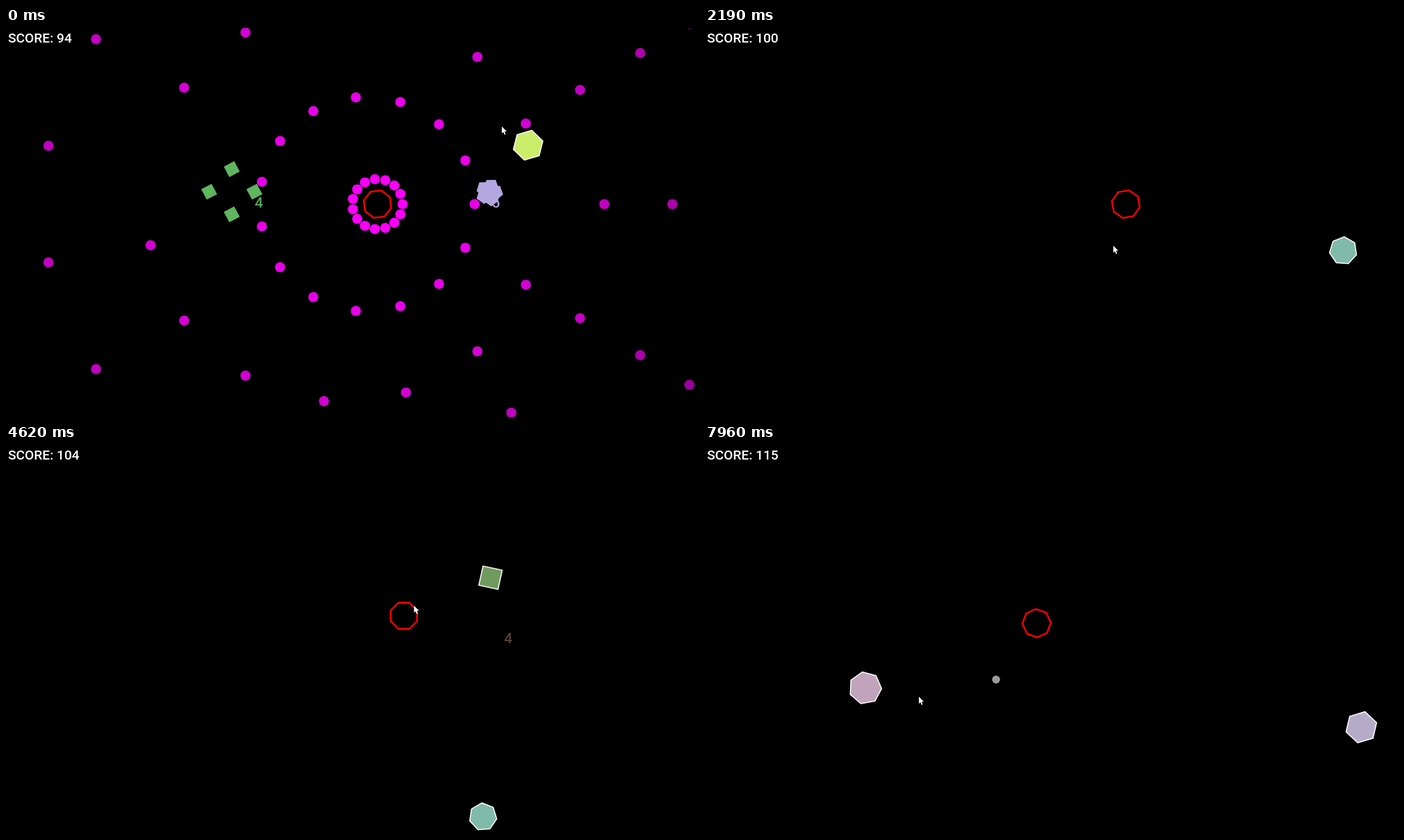
An HTML page with a canvas for the animation above (8000 ms loop, 998 by 561 pixels).

```html
<!DOCTYPE html>
<html lang="en">
<head>
<meta charset="utf-8">
<title>Polygon shooter</title>
<style>
  html, body { margin: 0; width: 100%; height: 100%; overflow: hidden; background: #000; }
  canvas { display: block; width: 998px; height: 561px; }
</style>
</head>
<body>
<canvas id="stage" width="998" height="561"></canvas>
<script>
const W = 998, H = 561, LOOP = 8000;
const SPIN = 0.06;            // degrees per ms
const SHARD_SPEED = 0.18, SHARD_LIFE = 500, LABEL_LIFE = 2000;
const SHOT_SPEED = 0.62, SHOT_LIFE = 420, RING_SPEED = 0.66;
const ctx = document.getElementById('stage').getContext('2d');
const rad = deg => deg * Math.PI / 180;

// Position at time `at`, drifting at (vx, vy) and bouncing off the walls.
const enemies = [
  { sides: 4, r: 20, color: '95,182,95', at: 0, x: 357, y: 239, vx: .177, vy: .016, born: -900, dies: -180 },
  { sides: 5, r: 19, color: '180,166,222', at: 0, x: 698.5, y: 239.5, vx: .053, vy: .05, born: -900, dies: -50 },
  { sides: 6, r: 22, color: '202,237,106', at: 0, x: 752, y: 169, vx: -.096, vy: .043, angle: 44, born: -900, dies: 140 },
  { sides: 7, r: 20, color: '128,186,170', at: 2190, x: 919, y: 321, vx: .144, vy: .0925, angle: 17, born: 1500, dies: 5970 },
  { sides: 4, r: 20, color: '180,131,95', at: 3770, x: 569, y: 232, vx: .173, vy: .04, angle: 30, born: 2260, dies: 3620 },
  { sides: 4, r: 20, color: '112,155,95', at: 5500, x: 558, y: 267, vx: -.159, vy: .086, angle: 20, born: 4150, dies: 5185 },
  { sides: 6, r: 23, color: '181,171,200', at: 6650, x: 761, y: 274, vx: .1405, vy: .1015, angle: 24.5, born: 5700, dies: 9000 },
  { sides: 7, r: 23.5, color: '193,163,187', at: 7960, x: 231, y: 350.5, vx: -.131, vy: -.111, angle: 2.5, born: 6700, dies: 9000 },
];

// Rings of 15 bullets: radius at time 0 (negative = not fired yet), centre x, bullets already spent.
const rings = [
  { r: 640, x: 399 }, { r: 535, x: 424 }, { r: 404, x: 457 },
  { r: 285, x: 487.7, spent: k => k === 0 || k === 8 },
  { r: 154.2, x: 520, spent: (k, t) => k === 14 && t > 140 },
  { r: 35.5, x: 535 }, { r: -119, x: 562 },
];

// Single shots: time fired, point aimed at, time of impact if any.
const shots = [
  [3480, 543, 226, 3620], [3718, 598, 231], [5080, 608, 240, 5185], [5424, 561, 261],
  [5720, 492, 413, 5970], [6460, 531, 333], [7805, 420, 337],
];

const playerPath = [[0, 535, 254], [16, 535, 254], [180, 562, 254], [920, 633, 254], [2190, 606, 254],
  [3770, 630, 236], [5500, 514, 257], [6650, 428, 257], [LOOP, 479, 257]];
const cursorPath = [[0, 714, 142], [920, 593, 295], [2190, 588, 314], [3770, 550, 219], [5150, 606, 238],
  [5500, 576, 269], [5930, 500, 400], [6650, 662, 334], [7960, 308, 363], [LOOP, 308, 363]];
const scores = [[0, 94], [140, 100], [3620, 104], [5185, 108], [5970, 115]];

function along(path, t, ease = u => u) {
  const i = Math.max(1, path.findIndex(p => p[0] > t));
  const [a, b] = [path[i - 1], path[i]];
  const u = ease((t - a[0]) / (b[0] - a[0]));
  return [a[1] + (b[1] - a[1]) * u, a[2] + (b[2] - a[2]) * u];
}
const smooth = u => u * u * (3 - 2 * u);

function bounce(v, low, high) {
  const span = high - low;
  const m = (((v - low) % (2 * span)) + 2 * span) % (2 * span);
  return low + (m > span ? 2 * span - m : m);
}

function enemyAt(e, t) {
  return [bounce(e.x + e.vx * (t - e.at), e.r, W - e.r),
          bounce(e.y + e.vy * (t - e.at), e.r, H - e.r)];
}

function polygon(x, y, r, sides, angle) {
  ctx.beginPath();
  for (let k = 0; k < sides; k++) {
    const a = rad(angle + 360 * k / sides);
    ctx.lineTo(x + r * Math.cos(a), y + r * Math.sin(a));
  }
  ctx.closePath();
}

function dot(x, y, r, color) {
  ctx.fillStyle = color;
  ctx.beginPath();
  ctx.arc(x, y, r, 0, 2 * Math.PI);
  ctx.fill();
}

function drawRing(ring, t) {
  const r = ring.r + RING_SPEED * t;
  if (r < 0 || r > 1100) return;
  for (let k = 0; k < 15; k++) {
    if (ring.spent && ring.spent(k, t)) continue;
    const a = rad(24 * k);
    dot(ring.x + r * Math.cos(a), 254 + r * Math.sin(a), 7.3, `rgba(255,0,255,${1 - r * .0006})`);
  }
}

function drawShot([fired, tx, ty, hit = fired + SHOT_LIFE], t) {
  if (t < fired || t >= hit) return;
  const [x, y] = along(playerPath, fired);
  const age = t - fired, k = SHOT_SPEED * age / Math.hypot(tx - x, ty - y);
  dot(x + (tx - x) * k, y + (ty - y) * k, 5.7, `rgba(255,255,255,${.97 * (1 - age / SHOT_LIFE)})`);
}

function drawEnemy(e, t) {
  if (t < e.born) return;
  const [x, y] = enemyAt(e, t);
  if (t < e.dies) {
    polygon(x, y, e.r, e.sides, e.angle + SPIN * (t - e.at));
    ctx.fillStyle = `rgb(${e.color})`;
    ctx.fill();
    ctx.strokeStyle = '#fff';
    ctx.lineWidth = 1.5;
    ctx.stroke();
    return;
  }
  const age = t - e.dies;
  if (age < SHARD_LIFE) {
    const [cx, cy] = enemyAt(e, e.dies);
    ctx.fillStyle = `rgba(${e.color},${Math.min(1, 2.5 * (1 - age / SHARD_LIFE))})`;
    for (let k = 0; k < e.sides; k++) {
      const a = rad(360 * k / e.sides), d = SHARD_SPEED * age;
      polygon(cx + d * Math.cos(a), cy + d * Math.sin(a), e.r * .6, e.sides, 17);
      ctx.fill();
    }
  }
  if (age < LABEL_LIFE) {
    ctx.font = '500 21px Roboto, sans-serif';
    ctx.textAlign = 'center';
    ctx.fillStyle = `rgba(${e.color},${1 - age / LABEL_LIFE})`;
    ctx.fillText(e.sides, x + 7, y + 19.5);
  }
}

function drawPlayer(t) {
  const [x, y] = along(playerPath, t);
  polygon(x, y, 20.5, 8, 15.5 + SPIN * t);
  ctx.strokeStyle = '#f00';
  ctx.lineWidth = 2.4;
  ctx.stroke();
}

function drawCursor(t) {
  const [x, y] = along(cursorPath, t, smooth);
  ctx.fillStyle = '#fff';
  ctx.beginPath();
  for (const [dx, dy] of [[0, 0], [0, 10], [2.3, 8], [4, 12], [5.5, 11.3], [4, 7.6], [7, 7]])
    ctx.lineTo(x + dx, y + dy);
  ctx.fill();
}

function drawScore(t) {
  const score = scores.filter(s => s[0] <= t).pop()[1];
  ctx.font = '500 19.2px Roboto, sans-serif';
  ctx.textAlign = 'left';
  ctx.fillStyle = '#fff';
  ctx.fillText('SCORE: ' + score, 3, 21);
}

function draw(t) {
  ctx.fillStyle = '#000';
  ctx.fillRect(0, 0, W, H);
  rings.forEach(r => drawRing(r, t));
  shots.forEach(s => drawShot(s, t));
  enemies.forEach(e => drawEnemy(e, t));
  drawPlayer(t);
  drawScore(t);
  drawCursor(t);
}

const start = performance.now();
function tick() {
  draw((performance.now() - start) % LOOP);
  requestAnimationFrame(tick);
}
tick();
</script>
</body>
</html>
```
